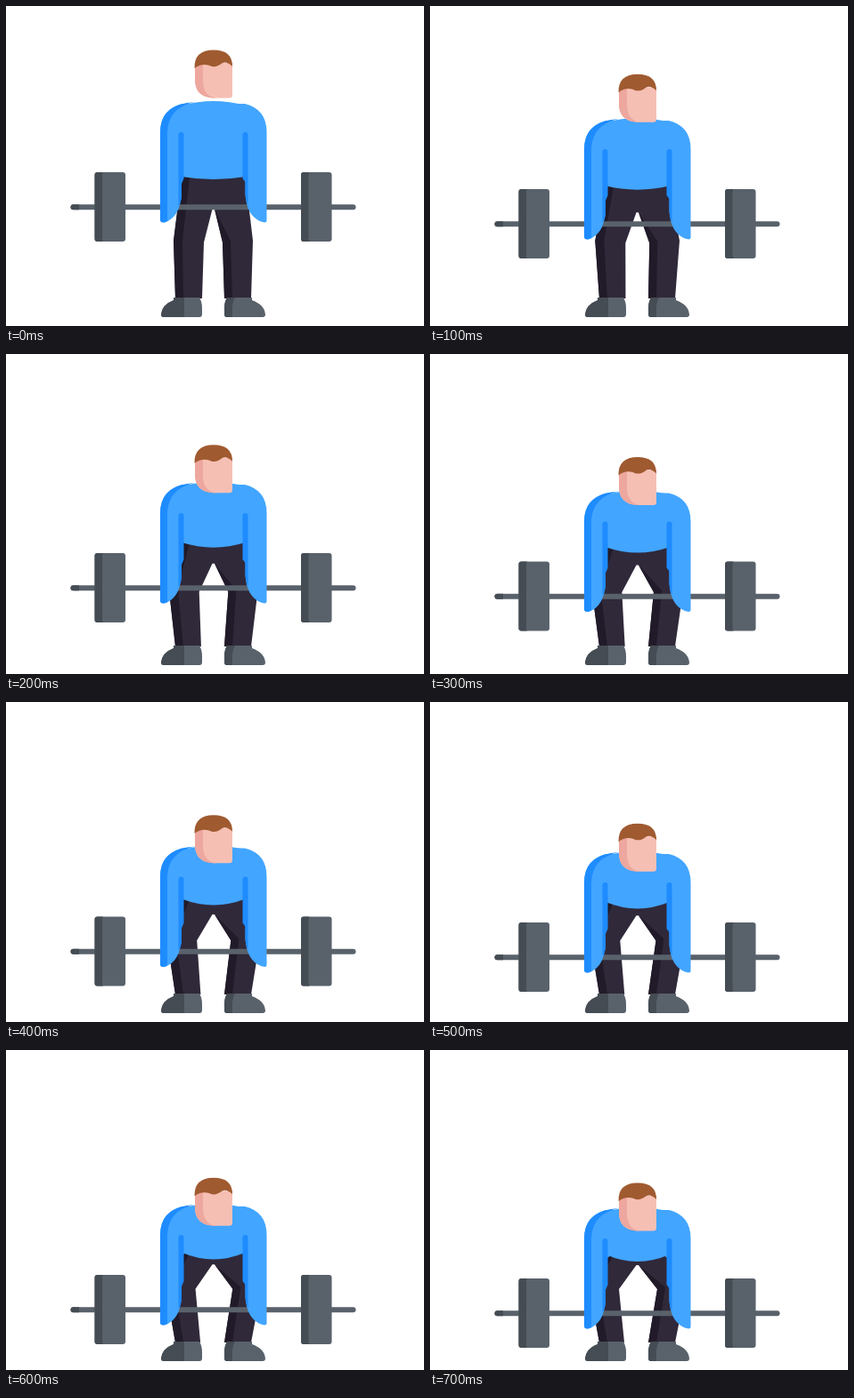
Animation, 469 px wide and 360 px high, one loop 800 ms. Source, as an HTML page:

```html
<!DOCTYPE html>
<html lang="en">
<head>
<meta charset="utf-8">
<title>Deadlift</title>
<style>
  html, body { margin: 0; width: 100%; height: 100%; overflow: hidden; background: #fff; }
  svg { display: block; width: 469px; height: 360px; }
  .steel { fill: #59626b; }
  .steelDark { fill: #454c53; }
  .cloth { fill: #30293a; }
  .clothDark { fill: #211a29; }
  .shirt { fill: #42a5ff; }
  .shirtDark { fill: #1e8cff; }
</style>
</head>
<body>
<svg viewBox="0 0 469 360">
  <path id="legs" class="cloth"/>
  <path id="legShade" class="clothDark"/>

  <g id="shoes">
    <path class="steel" d="M188 328H217Q220 333 220 340V347Q220 350 217 350H177Q174 350 174 347Q175 336 188 331Z"/>
    <path class="steelDark" d="M188 328H200V350H177Q174 350 174 347Q175 336 188 331Z"/>
    <path class="steel" d="M248 328H276V331Q290 336 291 347Q291 350 288 350H248Q245 350 245 347V340Q245 333 248 328Z"/>
    <path class="steelDark" d="M248 328H257Q254 333 254 340V350H248Q245 350 245 347V340Q245 333 248 328Z"/>
  </g>

  <g id="barbell">
    <rect class="steel" x="72.500" y="223.300" width="320" height="6" rx="3"/>
    <path class="steelDark" d="M82 223.300H75.500A3 3 0 0 0 75.500 229.300H82Z"/>
    <g id="plate">
      <rect class="steel" x="99.500" y="187" width="34.500" height="78" rx="3"/>
      <path class="steelDark" d="M109 187H102.500Q99.500 187 99.500 190V262Q99.500 265 102.500 265H109Q108 264 108 262V190Q108 188 109 187Z"/>
    </g>
    <use href="#plate" x="231.500"/>
  </g>

  <path id="torso" class="shirt"/>
  <g id="arms">
    <path class="shirt" d="M173 142Q173 116 198 110H205V160L197 165V212Q195 238 178 243.500Q173 244 173 240Z"/>
    <path class="shirt" d="M292.500 142Q292.500 116 268 110H260V160L268.500 165V212Q270 236 286 242.500L290 243.500Q292.500 243.500 292.500 241Z"/>
    <path class="shirtDark" d="M173 142Q173 114 203 109L212 108Q182 114 181 142V242Q173 246 173 240Z"/>
    <path class="shirtDark" d="M193.500 145A3 3 0 0 1 199.500 145V194L197 200V215Q196 222 193.500 225Z"/>
    <path class="shirtDark" d="M265.500 145A3 3 0 0 1 271.500 145V224Q268.500 218 268.500 212V198L265.500 194Z"/>
  </g>

  <g id="head">
    <path fill="#f6bfb4" d="M212 64H254V100Q254 103.500 250.500 103.500H232Q212 102 212 83Z"/>
    <path fill="#eda79e" d="M212 64H221V83Q221 102 236 103.500H232Q212 102 212 83Z"/>
    <path fill="#a05a30" d="M211.500 70Q211 49.500 233 49.500Q254 49.500 254 68Q248 62 243 64Q237 69 231 68Q221 63 211.500 70Z"/>
  </g>
</svg>
<script>
const el = id => document.getElementById(id);
const drop = [0, 19, 37, 46.5, 54.5, 61, 66, 70];  // bar descent per 100 ms step
const down = (id, y) => el(id).setAttribute("transform", `translate(0 ${y})`);
const shape = (id, d) => el(id).setAttribute("d", d);

function pose(b) {
  const p = b / 70;
  const hem = 192 + 38 * p, dip = 198 + 48 * p;
  const crotch = 228.5 + 13.5 * p, knee = 266 + 3 * p;
  const outL = 188 - 10 * p, inL = 222 - 10 * p;
  const inR = 243 + 12 * p, outR = 277 + 11 * p;

  down("barbell", b);
  down("arms", b);
  down("head", b * 10 / 7);

  shape("torso", `M197 ${hem}V${112 + b}Q233 ${102 + b} 268.5 ${112 + b}V${hem}Q233 ${dip} 197 ${hem}Z`);
  shape("legs", `M197 ${hem - 4}H268.500V${hem}L${outR} 264L275 329H245L${inR} ${knee}
    L234 ${crotch}H231.500L${inL} ${knee}L${220 - 2 * p} 329H190L${outL} 264L197 ${hem}Z`);
  shape("legShade", `M197 ${hem - 4}H206V${hem}L${outL + 10} 264L199 329H190L${outL} 264L197 ${hem}Z
    M234 ${crotch}L${inR + 9} ${knee - 2}L254 329H245L${inR} ${knee}Z`);
}

function frame(now) {
  pose(drop[Math.floor(now % 800 / 100)]);
  requestAnimationFrame(frame);
}
pose(0);
const start = performance.now();
requestAnimationFrame(function loop(now) {
  frame = t => {
    pose(drop[Math.floor(Math.max(0, t - start) % 800 / 100)]);
    requestAnimationFrame(frame);
  };
  frame(now);
});
</script>
</body>
</html>
```
